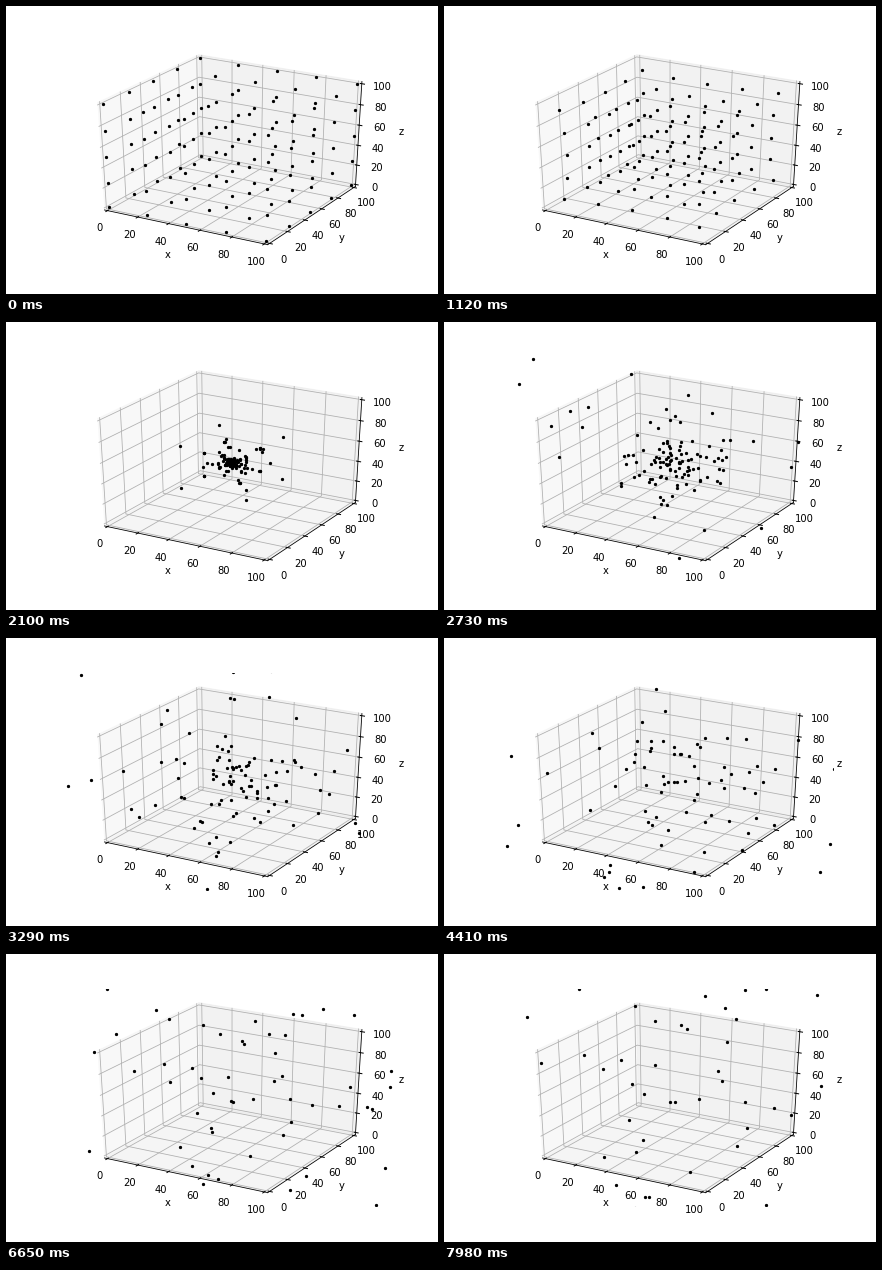
A matplotlib script that plays this animation: 432 by 288 pixels, repeating every 8 s.

```python
import numpy as np
import matplotlib.pyplot as plt
from matplotlib.animation import FuncAnimation
from matplotlib.patches import Polygon, Rectangle

W, H = 432, 288
STEP, TICK, LOOP = 70, 20, 8000
STEPS = -(-LOOP // STEP)
LO, HI = -100 / 48, 100 + 100 / 48
LEFT, TOP, WIDE, TALL = 54, 34.56, 334.8, 217.44
MID = np.array([LEFT + WIDE * 0.95 / 1.85, TOP + TALL * 0.9 / 1.85])
ELEV, AZIM, DIST = np.radians(30), np.radians(-60), 10


def project(p):
    """Perspective view of the 0..100 cube, in stage pixels."""
    x, y, z = np.moveaxis(np.asarray(p, float) / 100 - 0.5, -1, 0)
    ce, se, ca, sa = np.cos(ELEV), np.sin(ELEV), np.cos(AZIM), np.sin(AZIM)
    right = -sa * x + ca * y
    up = -se * ca * x - se * sa * y + ce * z
    near = ce * ca * x + ce * sa * y + se * z
    near = np.where(np.abs(near) < DIST, near, np.nan)
    zoom = DIST / (DIST - near) / 1.85
    return np.stack([MID[0] + right * zoom * WIDE,
                     MID[1] - up * zoom * TALL], -1)


# ---------- motion ----------
def collapse(steps, gm=5.4, soft=4.0):
    """Resting 5x5x5 lattice falling together under its own gravity."""
    g = np.linspace(0, 100, 5)
    pos = np.stack(np.meshgrid(g, g, g, indexing="ij"), -1).reshape(-1, 3)

    def pull(p):
        d = p[None] - p[:, None]
        r2 = (d ** 2).sum(-1) + soft ** 2
        return gm * (d / r2[..., None] ** 1.5).sum(1)

    vel = pull(pos) / 2
    out = [pos]
    for _ in range(steps):
        pos = pos + vel
        vel = vel + pull(pos)
        out.append(pos)
    return np.array(out)


def build(first=28, final=36):
    """Each body falls in, then is flung out of the core in a straight line."""
    rng = np.random.default_rng(4)
    fall = collapse(final)
    n = fall.shape[1]
    release = rng.integers(first, final + 1, n)
    heading = rng.normal(size=(n, 3))
    heading /= np.linalg.norm(heading, axis=1, keepdims=True)
    vel = heading * rng.lognormal(1.28, 1.25, (n, 1))

    track = []
    for t in range(STEPS):
        held = fall[np.minimum(t, release), np.arange(n)]
        flown = np.maximum(t - release, 0)[:, None]
        track.append(project(held + vel * flown))
    return track


# ---------- stage ----------
plt.rcParams["font.family"] = "DejaVu Sans"
fig = plt.figure(figsize=(W / 72, H / 72), dpi=72, facecolor="white")
ax = fig.add_axes([0, 0, 1, 1])
ax.set_xlim(0, W)
ax.set_ylim(H, 0)
ax.axis("off")


def stroke(pts, color, width, z):
    ax.plot(*project(pts).T, color=color, lw=width, zorder=z,
            solid_capstyle="projecting", solid_joinstyle="round")


def text(p, s, va):
    x, y = project(p)
    ax.text(x, y, s, fontsize=10, ha="center", va=va, zorder=4)


def with_value(p, i, v):
    q = np.array(p, float)
    q[i] = v
    return q


def pushed(p, axis, d):
    """Move p away from the cube's middle, except along one axis."""
    return [c if i == axis else c + (d if c > 50 else -d)
            for i, c in enumerate(p)]


back = np.array([LO, HI, LO])
flip = LO + HI - back
unit = 100 / 12
per_point = 48 / (WIDE + TALL) * unit

# walls, each with its last edge left open
for i, shade in enumerate((0.95, 0.9, 0.925)):
    a, b = [j for j in range(3) if j != i]
    p0 = with_value([LO] * 3, i, back[i])
    p1 = with_value(p0, a, HI)
    quad = [p0, p1, with_value(p1, b, HI), with_value(p0, b, HI)]
    ax.add_patch(Polygon(project(quad), closed=False, alpha=0.5, lw=1,
                         fc=str(shade), ec=str(shade), zorder=1))

starts = [(LO, LO, LO), (HI, LO, LO), (HI, HI, LO)]
for i, (name, start) in enumerate(zip("xyz", starts)):
    side = 1 if i == 0 else 0
    out = -unit if i == 0 else unit
    stroke([with_value(start, i, LO), with_value(start, i, HI)],
           "black", 0.8, 3)
    text(pushed(with_value(start, i, 50), i, 25 * per_point), name, "center")
    for v in range(0, 101, 20):
        corner = with_value(back, i, v)
        j, k = (i + 1) % 3, (i + 2) % 3
        stroke([with_value(corner, j, flip[j]), corner,
                with_value(corner, k, flip[k])], "#b0b0b0", 0.8, 2)
        at = with_value(start, i, v)
        stroke([with_value(at, side, at[side] + 0.2 * out),
                with_value(at, side, at[side] - 0.1 * out)],
               "black", 1, 3)
        text(pushed(at, i, 11.5 * per_point), str(v), "top")

track = build()
dots, = ax.plot([], [], "o", color="black", ms=2.24, mew=1, zorder=5)
dots.set_clip_path(Rectangle((LEFT, TOP), WIDE, TALL, transform=ax.transData))


def draw(k):
    t = min((k * TICK + TICK // 2) // STEP, STEPS - 1)
    dots.set_data(*track[t].T)
    return dots,


anim = FuncAnimation(fig, draw, frames=LOOP // TICK, interval=TICK,
                     init_func=lambda: draw(0), repeat=True, repeat_delay=0)
plt.show()
```
